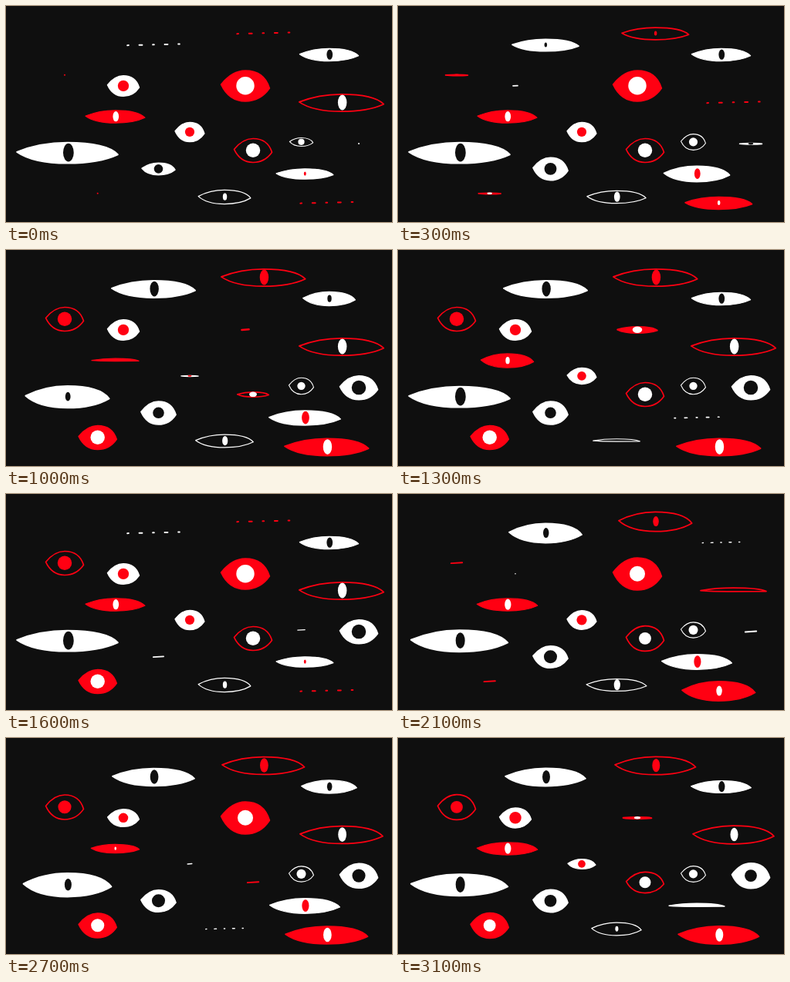
Write an HTML page with a canvas that moves like this. It is 500 px wide and 281 px high and loops after 3200 ms.

```html
<!DOCTYPE html>
<html lang="en">
<head>
<meta charset="utf-8">
<title>Blinking eyes</title>
<style>
  html, body { margin: 0; height: 100%; overflow: hidden; background: #0f0f0f; }
  canvas { display: block; width: 100vw; height: 100vh; }
</style>
</head>
<body>
<canvas width="500" height="281"></canvas>
<script>
const ctx = document.querySelector('canvas').getContext('2d');
const DARK = '#0f0f0f', WHITE = '#fff', RED = '#ff0012';
const STEP_MS = 100, LOOP_STEPS = 32;

const clamp01 = t => Math.min(1, Math.max(0, t));
const smooth = t => t * t * (3 - 2 * t);
const backOut = t => 1 + 2.7 * (t - 1) ** 3 + 1.7 * (t - 1) ** 2;

// Lengths are fractions of the eye's half width; `open` runs from 0 to 1
// and `wobble` is the three-step hand-drawn jitter of an open eye.
const wide = {
  period: 16, line: 0.031, firstLid: 2, dashWidth: 0.036, tilt: -0.024,
  dashes: age => age === 0
    ? [0, 1, 2, 3, 4].map(i => {
        const x = 0.3 * (i - 2), half = i % 2 ? 0.035 : 0.015;
        return [x - half, x + half];
      })
    : [[-0.63, -0.49], [-0.33, 0.05], [0.21, 0.7]],
  pose(age, open, wobble) {
    const height = (0.222 - 0.006 * wobble) * backOut(open);
    const pupil = open ** 0.7 * (1 + 0.08 * wobble);
    return {
      width: 0.78 + 0.2 * open ** 1.5 + 0.023 * wobble,
      up: Math.max(height, 0.085),
      down: Math.max(height, 0.03),
      rx: 0.097 * pupil,
      ry: 0.168 * pupil
    };
  }
};

const round = {
  period: 19, line: 0.064, firstLid: 3, dashWidth: 0.077, tilt: -0.06,
  dashes: age => [[-0.14 * age, 0.14 * age]],
  pose(age, open, wobble) {
    const height = 0.06 + 0.595 * smooth(clamp01((age - 3) / 4)) - 0.02 * wobble;
    const rx = 0.335 * open ** 0.6 + 0.03 * wobble;
    return {
      width: 0.99 - 0.77 * (1 - open) ** 3,
      up: height,
      down: height,
      rx,
      ry: Math.min(rx, 0.85 * height)
    };
  }
};

// kind, x, y, half width, lid colour, pupil colour, first step, outlined
const eyes = [
  [wide, 191, 51, 55, WHITE, DARK, 0],
  [wide, 333.3, 36, 55.3, RED, RED, 0, true],
  [wide, 418.5, 63.5, 39.5, WHITE, DARK, 5],
  [wide, 434.5, 126, 55.6, RED, WHITE, 3, true],
  [wide, 141.5, 144, 39.8, RED, WHITE, 8],
  [wide, 79.5, 191.2, 66.3, WHITE, DARK, 6],
  [wide, 283, 248.5, 39.5, WHITE, WHITE, 11, true],
  [wide, 387, 218.5, 47, WHITE, RED, 13],
  [wide, 415.3, 256.5, 55.2, RED, WHITE, 0],
  [round, 76, 90, 25.6, RED, RED, 0, true],
  [round, 152, 104, 21.4, WHITE, RED, 2],
  [round, 310, 104, 32.5, RED, WHITE, 9],
  [round, 238, 164, 19.8, WHITE, RED, 7],
  [round, 320, 188, 25.6, RED, WHITE, 6, true],
  [round, 382.5, 177, 16.7, WHITE, WHITE, -5, true],
  [round, 457, 179.3, 25.6, WHITE, DARK, 0],
  [round, 197.5, 212, 23.6, WHITE, DARK, -5],
  [round, 118.7, 244, 25.6, RED, WHITE, 0]
];

// Lens with a fuller upper right side and a slightly lower right tip.
function traceLids(w, up, down) {
  const left = -0.1 * up, right = 0.15 * up;
  ctx.beginPath();
  ctx.moveTo(-w, left);
  ctx.bezierCurveTo(-0.77 * w, -0.55 * up, -0.43 * w, -up, 0, -up);
  ctx.bezierCurveTo(0.5 * w, -up, 0.85 * w, -0.62 * up, w, right);
  ctx.bezierCurveTo(0.78 * w, 0.65 * down, 0.48 * w, down, 0, down);
  ctx.bezierCurveTo(-0.45 * w, down, -0.8 * w, 0.58 * down, -w, left);
  ctx.closePath();
}

function drawEye([kind, x, y, size, lid, pupil, start, outlined], step) {
  const age = (step - start + 2 * kind.period) % kind.period;
  ctx.save();
  ctx.translate(x, y);
  ctx.scale(size, size);
  ctx.strokeStyle = ctx.fillStyle = lid;
  ctx.lineCap = ctx.lineJoin = 'round';

  if (age < kind.firstLid) {
    ctx.lineWidth = kind.dashWidth;
    ctx.beginPath();
    for (const [from, to] of kind.dashes(age)) {
      ctx.moveTo(from, from * kind.tilt - 0.012);
      ctx.lineTo(to, to * kind.tilt - 0.012);
    }
    ctx.stroke();
  } else {
    const open = clamp01((age - 2) / 5);
    const wobble = open < 1 ? 0 : Math.cos(2 * Math.PI * (age - 1.25) / 3);
    const { width, up, down, rx, ry } = kind.pose(age, open, wobble);
    const inset = kind.line / 2;
    ctx.lineWidth = kind.line;
    traceLids(width - inset, up - inset, down - inset);
    if (!outlined) ctx.fill();
    ctx.stroke();
    ctx.fillStyle = pupil;
    ctx.beginPath();
    ctx.ellipse(kind === wide ? 0.2 * rx : 0, -0.008, rx, ry, 0, 0, 2 * Math.PI);
    ctx.fill();
  }
  ctx.restore();
}

function tick() {
  const step = Math.floor(performance.now() / STEP_MS) % LOOP_STEPS;
  ctx.fillStyle = DARK;
  ctx.fillRect(0, 0, 500, 281);
  for (const eye of eyes) drawEye(eye, step);
  requestAnimationFrame(tick);
}
tick();
</script>
</body>
</html>
```
